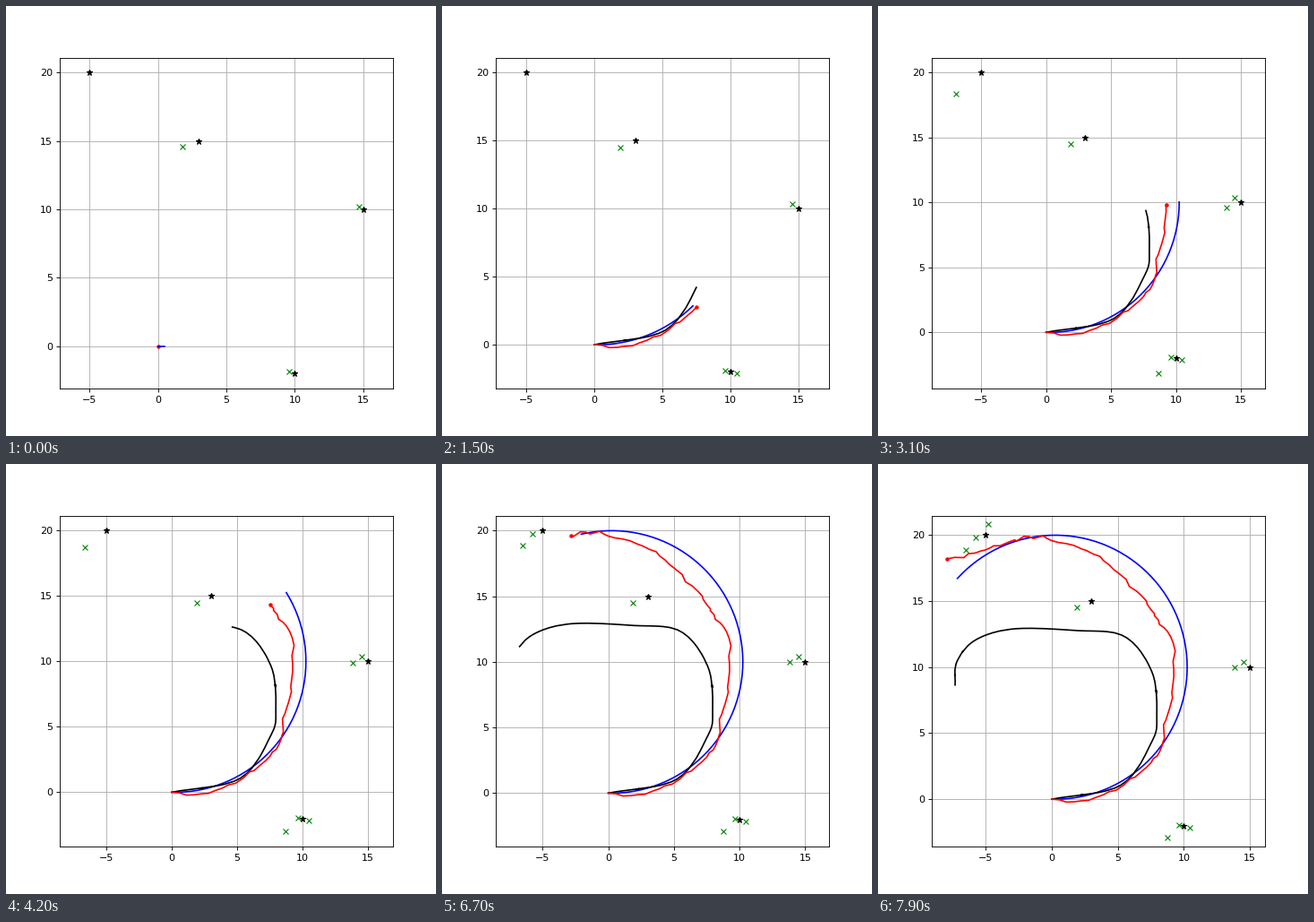
A matplotlib script for the animation above (8 s loop, 480x480 px).

```python
import numpy as np
import matplotlib.pyplot as plt
from matplotlib.animation import FuncAnimation

FRAMES, INTERVAL = 80, 100
STEP, TURN = 0.5, 0.05
SETTLE = 10  # steps over which a new landmark eases to its final place

BEACONS = np.array([(10, -2), (15, 10), (3, 15), (-5, 20)])

# Key points, evenly spaced in time
ESTIMATE = [
    (0, 0), (2.75, -.1), (5.4, 1.05), (7.45, 2.7), (8.4, 4.3), (8.78, 6.3),
    (9.2, 9.05), (9.1, 12.1), (7.9, 13.75), (7.05, 15.15), (4.9, 17.25),
    (3, 18.65), (.4, 19.45), (-1.8, 19.9), (-3.6, 19.35), (-5.4, 18.8),
    (-7.95, 18.2),
]
ODOMETRY = [
    (0, 0), (5.2, 1.05), (7.57, 4.35), (7.95, 6.3), (7.6, 9.6), (5.5, 12.33),
    (1.8, 12.78), (-2.9, 12.9), (-5.8, 12.05), (-7.2, 10.4), (-7.33, 8.65),
]
# Mapped landmarks: step of first sighting, first guess, final place
MAPPED = [
    (0, (1.79, 14.6), (1.9, 14.5)),
    (0, (14.66, 10.18), (14.52, 10.38)),
    (0, (9.56, -1.87), (9.64, -1.93)),
    (4, (10.47, -2.1), (10.46, -2.15)),
    (25, (8.6, -3.39), (8.75, -2.93)),
    (25, (13.95, 9.3), (13.82, 10)),
    (25, (-7.3, 17.9), (-6.52, 18.9)),
    (50, (-5.55, 19.3), (-5.8, 19.85)),
    (71, (-4.75, 20.75), (-4.82, 20.87)),
]


def spline(keys, t):
    """Catmull-Rom curve through the keys; key j is reached at t = j."""
    k = np.array(keys, float)
    k = np.vstack([2 * k[0] - k[1], k, 2 * k[-1] - k[-2]])
    j = np.clip(t.astype(int), 0, len(keys) - 2)
    u = (t - j)[:, None]
    a, b, c, d = k[j], k[j + 1], k[j + 2], k[j + 3]
    return b + u / 2 * (c - a + u * (2*a - 5*b + 4*c - d
                                     + u * (3*b - a - 3*c + d)))


def track(keys, seed, slip=0, wobble=0):
    """Noisy path: slip shifts points along the curve, wobble off it."""
    rng = np.random.default_rng(seed)
    t = np.linspace(0, len(keys) - 1, FRAMES)
    fade = np.abs(np.sin(np.pi * t))
    path = spline(keys, t + slip * fade * rng.normal(size=FRAMES))
    path += wobble * fade[:, None] * rng.normal(size=path.shape)
    return np.vstack([(0, 0), path])


def true_track():
    yaw = TURN * np.arange(FRAMES)
    moves = STEP * np.column_stack([np.cos(yaw), np.sin(yaw)])
    return np.vstack([(0, 0), np.cumsum(moves, axis=0)])


truth = true_track()
odometry = track(ODOMETRY, seed=4, slip=.07)
estimate = track(ESTIMATE, seed=7, wobble=.11)

fig, ax = plt.subplots(figsize=(6, 6), dpi=80)


def draw(i):
    end = i + 2
    ax.cla()
    ax.plot(*BEACONS.T, "*k")
    ax.plot(*estimate[end - 1], ".r")
    for born, first, last in MAPPED:
        if i >= born:
            first, last = np.array(first), np.array(last)
            ease = np.exp((born - i) / SETTLE)
            ax.plot(*(last + (first - last) * ease), "xg")
    for line, style in ((truth, "-b"), (odometry, "-k"), (estimate, "-r")):
        ax.plot(*line[:end].T, style)
    ax.axis("equal")
    ax.grid(True)


anim = FuncAnimation(fig, draw, frames=FRAMES, interval=INTERVAL,
                     init_func=lambda: None, repeat=True)
plt.show()
```
